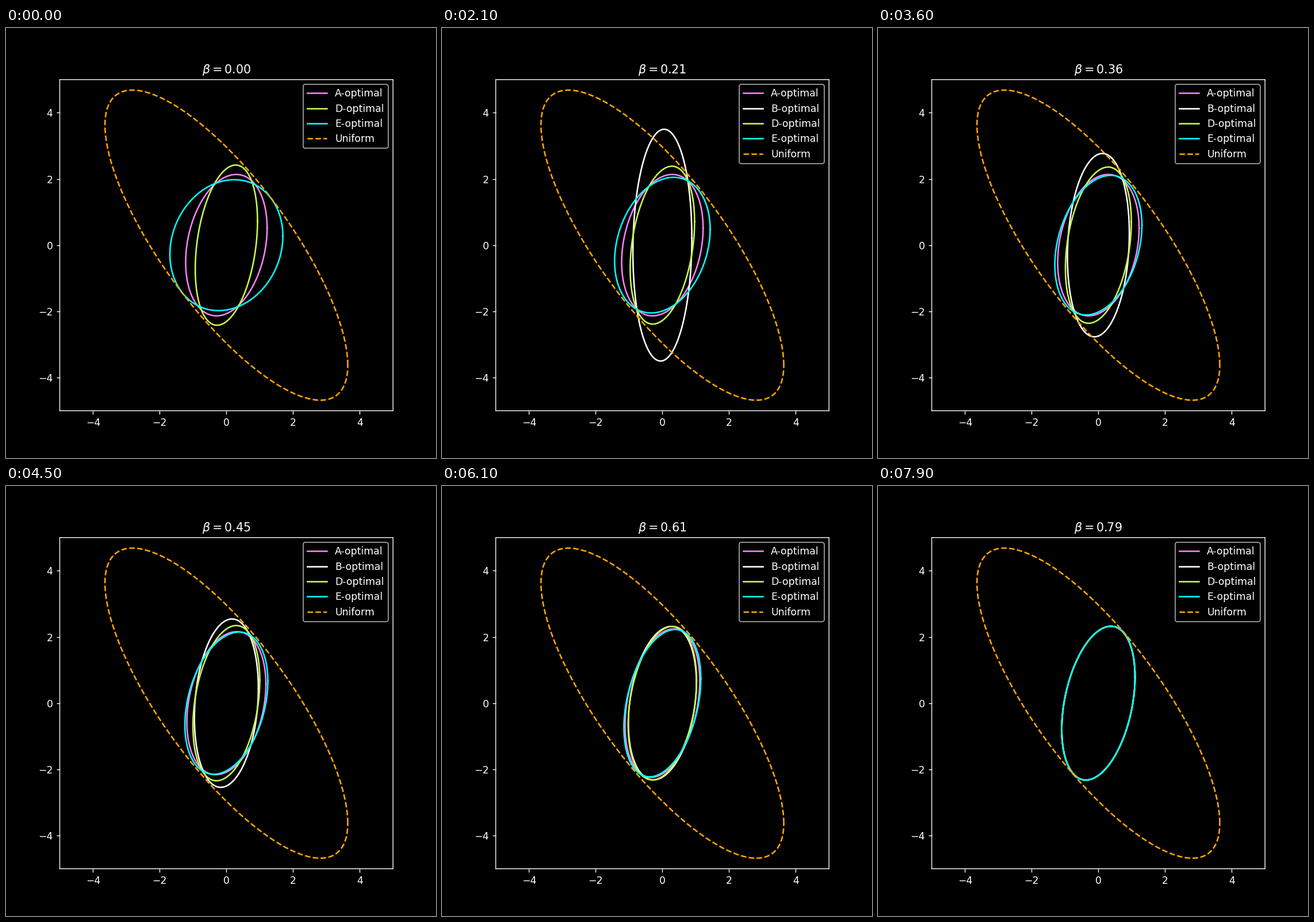
A matplotlib script for the animation above (8000 ms loop, 748 by 748 pixels).

```python
import numpy as np
import matplotlib.pyplot as plt
from matplotlib.animation import FuncAnimation

plt.style.use("dark_background")

SIZE = 748
FRAMES = 80
COLORS = {"A-optimal": "#fa81f7", "B-optimal": "white",
          "D-optimal": "#c9fa4c", "E-optimal": "cyan"}

theta = np.linspace(0, 2 * np.pi, 200)


def ellipse(a, b, s):
    """Ellipse with extents a and b whose rightmost point is (a, s)."""
    h = np.sqrt(b * b - s * s)
    return a * np.cos(theta), s * np.cos(theta) + h * np.sin(theta)


def designs(beta):
    """Extents and tilt (a, b, s) per criterion; all merge as beta grows."""
    e = (max((0.348 + 0.66 * beta) ** -0.5, 1.103),
         1.977 + 0.30 * beta + 0.175 * beta ** 2,
         0.275 + 1.10 * beta - 0.55 * beta ** 2)
    a_b = 0.835 + 0.20 * beta + 0.17 * beta ** 2
    d = (max(0.934 + 0.153 * beta, a_b),
         max(2.419 - 0.167 * beta, e[1]),
         max(0.725 - 0.07 * beta, beta))
    # B grows without bound towards beta = 0
    height = (0.415 * beta - 0.10 * beta ** 2 - 0.13 * beta ** 3 + 1e-4) ** -0.5
    b = (a_b, max(height, d[1]), beta)
    a = (max(min(1.222, 1.37 - 0.41 * beta), a_b),
         min(max(2.135, 1.93 + 0.51 * beta), d[1]),
         max(0.518, 0.27 + 0.67 * beta))
    return dict(zip(COLORS, (a, b, d, e)))


fig, ax = plt.subplots(figsize=(6, 6), dpi=SIZE / 6)
ticks = range(-4, 5, 2)
ax.set(xlim=(-5, 5), ylim=(-5, 5), xticks=ticks, yticks=ticks)
for spine in ax.spines.values():
    spine.set_snap(False)
title = ax.set_title("")

lines = {name: ax.plot([], [], color=color, label=name)[0]
         for name, color in COLORS.items()}
uniform, = ax.plot(*ellipse(3.643, 4.683, -3.626), "--", color="orange",
                   label="Uniform")


def update(i):
    beta = i / 100
    for name, shape in designs(beta).items():
        lines[name].set_data(*ellipse(*shape))
    # The B criterion is undefined at zero
    lines["B-optimal"].set_visible(i > 0)
    shown = [ln for ln in lines.values() if ln.get_visible()] + [uniform]
    ax.legend(handles=shown, loc="upper right", labelspacing=0.48)
    title.set_text(rf"$\beta = {beta:.2f}$")
    return []


anim = FuncAnimation(fig, update, frames=FRAMES, interval=100, repeat=True,
                     repeat_delay=0, init_func=lambda: update(0))
plt.show()
```
